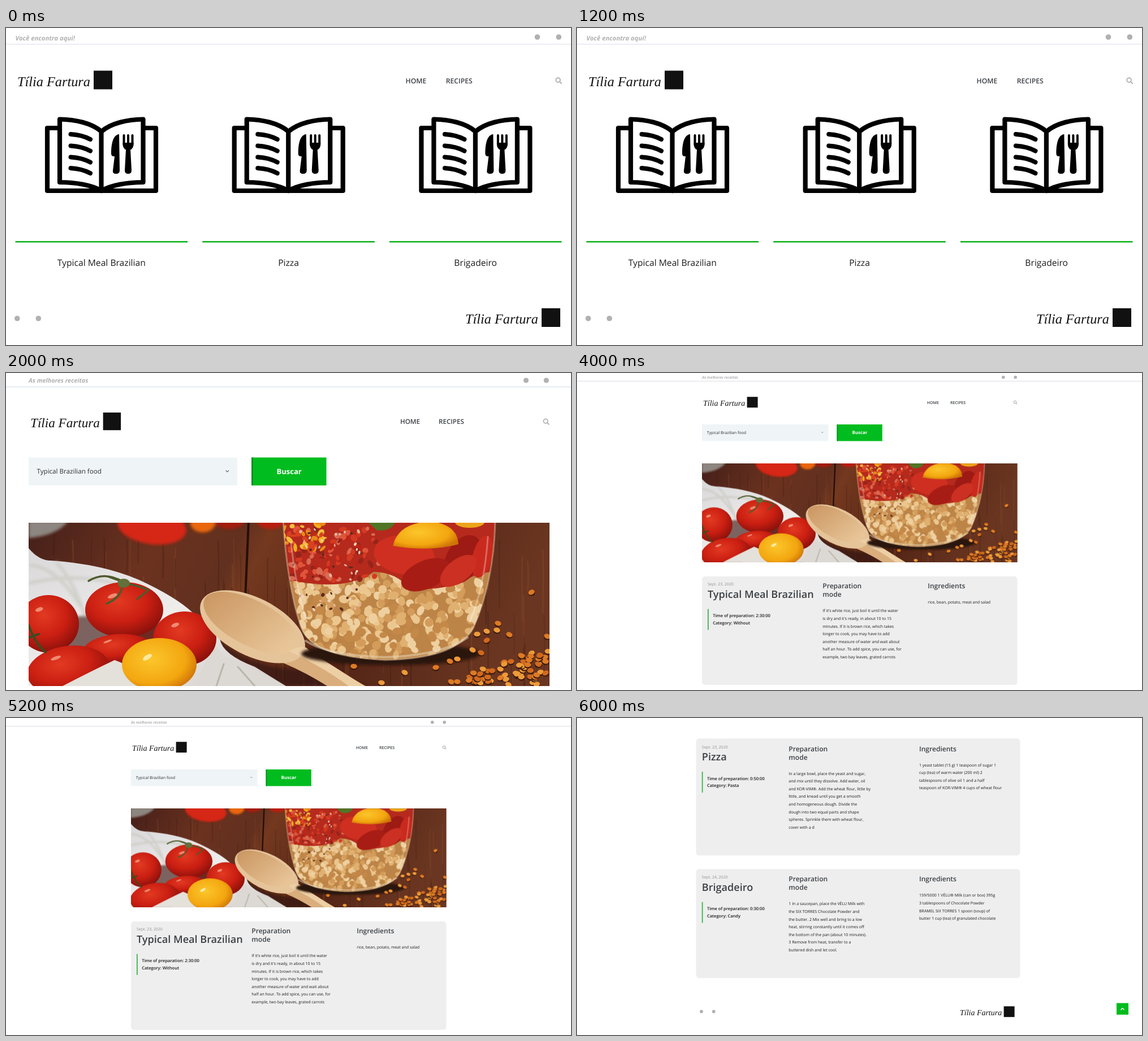
An HTML page for the animation above (8 s loop, 999 by 561 pixels).

```html
<!DOCTYPE html>
<html lang="en">
<head>
<meta charset="utf-8">
<title>Recipe site tour</title>
<style>
  html, body { margin: 0; width: 100%; height: 100%; overflow: hidden; background: #fff; }
  svg { display: block; width: 100vw; height: 100vh; }
  text { font-family: "Open Sans", sans-serif; text-rendering: geometricPrecision; }
  .brand { font-family: "Liberation Serif", "Times New Roman", serif; font-style: italic; }
</style>
</head>
<body>
<svg id="stage" viewBox="0 0 999 561" xmlns="http://www.w3.org/2000/svg"></svg>
<script>
const GREEN = '#00bc1e', GREY = '#b1b1b1', INK = '#1c1c1c', HEAD = '#3b4045';
const BRAND = 'Tília Fartura';
const HOLD = 2000;

let seed = 11;
const rnd = () => (seed = (seed * 16807) % 2147483647) / 2147483647;
const pick = list => list[Math.floor(rnd() * list.length)];

// Basic shapes
const text = (x, y, str, size, fill = INK, more = '') =>
  `<text x="${x}" y="${y}" font-size="${size}" fill="${fill}" ${more}>${str}</text>`;
const bold = (x, y, str, size, fill = INK, more = '') =>
  text(x, y, str, size, fill, 'font-weight="600" ' + more);
const rect = (x, y, w, h, fill, r = 0) =>
  `<rect x="${x}" y="${y}" width="${w}" height="${h}" rx="${r}" fill="${fill}"/>`;
const oval = (x, y, rx, ry, fill, turn = 0) =>
  `<ellipse cx="${x}" cy="${y}" rx="${rx}" ry="${ry}" fill="${fill}" transform="rotate(${turn} ${x} ${y})"/>`;
const path = (d, fill, more = '') => `<path d="${d}" fill="${fill}" ${more}/>`;
const line = (d, color, w, more = '') =>
  path(d, 'none', `stroke="${color}" stroke-width="${w}" stroke-linecap="round" stroke-linejoin="round" ${more}`);
const repeat = (n, fn) => Array.from({ length: n }, (_, i) => fn(i)).join('');

// Page parts
const social = (x1, x2, y, r) => oval(x1, y, r, r, GREY) + oval(x2, y, r, r, GREY);

const search = (x, y, k) =>
  `<g transform="translate(${x} ${y}) scale(${k})">
    <circle cx="-.9" cy="-.9" r="3.9" fill="none" stroke="${GREY}" stroke-width="1.9"/>
    ${line('M2.2 2.2L5 5', GREY, 2.1)}</g>`;

const logo = (x, y, k) =>
  `<g transform="translate(${x} ${y}) scale(${k})">
    ${text(0, 10, BRAND, 24.3, '#111', 'class="brand"')}
    ${rect(135, -17, 33, 33, '#111')}</g>`;

const menu = (x1, x2, y, size) =>
  bold(x1, y, 'HOME', size, HEAD) + bold(x2, y, 'RECIPES', size, HEAD);

const slogan = (x, y, str, size) =>
  text(x, y, str, size, GREY, 'font-weight="700" font-style="italic"');

function book(dx) {
  const half = 'M168.500 183C151 168 122 162 95 161.500V273C123 273 152 278 168.500 288';
  return `<g transform="translate(${dx} 0)">
    ${line('M92 177H73V288H265V177H246', '#000', 8.2)}
    ${line(half, '#000', 8.2)}
    <g transform="translate(337.500 0) scale(-1 1)">${line(half, '#000', 8.2)}</g>
    ${line('M168.500 183V288', '#000', 8.2)}
    ${[188, 208.5, 228.5, 248].map(y => line(`M114.500 ${y}Q134 ${y + 1} 149 ${y + 9}`, '#000', 8)).join('')}
    ${path('M200 188C190 189 186 203 186 222Q186 227 190 227H192L189 252Q188 258 194.500 258Q201 258 201 252Z', '#000')}
    ${[208.5, 216, 223.5].map(x => line(`M${x} 190V206`, '#000', 4)).join('')}
    ${path('M206.500 203H225.500Q226 213 220 215.500L222 252Q222 258 216 258Q210 258 210 252L212 215.500Q206 213 206.500 203Z', '#000')}
  </g>`;
}

const finder = (x, y, k) =>
  `<g transform="translate(${x} ${y}) scale(${k})">
    ${rect(0, 0, 369, 49.5, '#eff4f7')}
    ${text(14.5, 28.5, 'Typical Brazilian food', 11.62, '#2e2e2e')}
    ${line('M349 23.200L351.300 25.500L353.600 23.200', '#777', 1.4)}
    ${rect(394, 0, 132.5, 49.5, GREEN)}${rect(394, 0, 2.6, 49.5, '#0b8a1c')}
    ${text(460.7, 29.4, 'Buscar', 13, '#fff', 'font-weight="700" text-anchor="middle"')}</g>`;

const lines = (x, y, rows) =>
  rows.map((row, i) => text(x, y + i * 13.55, row, 7.03)).join('');

// y is the layout origin; box is the grey panel [x, y, w, h]
function card(y, box, cols, r) {
  const [a, b, c] = cols;
  return rect(...box, '#eee', 5.5) +
    text(a, y + 17.7, r.date, 7.03, '#8f9294') +
    bold(a, y + 39.2, r.name, 18.07, HEAD) +
    rect(a, y + 59, 1.7, 37, '#2fb344') +
    bold(a + 9.2, y + 73.6, 'Time of preparation: ' + r.time, 7.53) +
    bold(a + 9.2, y + 86, 'Category: ' + r.kind, 7.53) +
    bold(b, y + 22.6, 'Preparation', 12.05, HEAD) +
    bold(b, y + 37.8, 'mode', 12.05, HEAD) +
    lines(b, y + 64.8, r.steps) +
    bold(c, y + 22.6, 'Ingredients', 12.05, HEAD) +
    lines(c, y + 49.8, r.needs);
}

const meal = {
  date: 'Sept. 23, 2020', name: 'Typical Meal Brazilian', time: '2:30:00', kind: 'Without',
  steps: ["If it's white rice, just boil it until the water", "is dry and it's ready, in about 10 to 15",
    'minutes. If it is brown rice, which takes', 'longer to cook, you may have to add',
    'another measure of water and wait about', 'half an hour. To add spice, you can use, for',
    'example, two bay leaves, grated carrots'],
  needs: ['rice, bean, potato, meat and salad']
};
const pizza = {
  date: 'Sept. 23, 2020', name: 'Pizza', time: '0:50:00', kind: 'Pasta',
  steps: ['In a large bowl, place the yeast and sugar,', 'and mix until they dissolve. Add water, oil',
    'and KOR-VIM®. Add the wheat flour, little by', 'little, and knead until you get a smooth',
    'and homogeneous dough. Divide the', 'dough into two equal parts and shape',
    'spheres. Sprinkle them with wheat flour,', 'cover with a d'],
  needs: ['1 yeast tablet (15 g) 1 teaspoon of sugar 1', 'cup (tea) of warm water (200 ml) 2',
    'tablespoons of olive oil 1 and a half', 'teaspoon of KOR-VIM® 4 cups of wheat flour']
};
const sweet = {
  date: 'Sept. 24, 2020', name: 'Brigadeiro', time: '0:30:00', kind: 'Candy',
  steps: ['1 In a saucepan, place the VÉLU Milk with', 'the SIX TORRES Chocolate Powder and',
    'the butter. 2 Mix well and bring to a low', 'heat, stirring constantly until it comes off',
    'the bottom of the pan (about 10 minutes).', '3 Remove from heat, transfer to a',
    'buttered dish and let cool.'],
  needs: ['159/5000 1 VÉLU® Milk (can or box) 395g', '3 tablespoons of Chocolate Powder',
    'BRAMEL SIX TORRES 1 spoon (soup) of', 'butter 1 cup (tea) of granulated chocolate']
};

// Still life: tomatoes, spoon, jar and lentils on wood
function photo() {
  const jar = 'M490 260C494 330 505 400 520 445C531 482 570 503 670 508C760 506 806 486 826 452C850 400 864 330 865 260Z';
  const tomato = (x, y, rx, ry, turn = 0) =>
    oval(x, y, rx, ry, 'url(#red)', turn) + oval(x - rx * .3, y - ry * .5, rx * .13, ry * .07, '#f08a72', -20);
  const lentil = (x, y) =>
    oval(x, y + 2, 6, 4.5, '#3a180c') + oval(x, y, 5.8, 4.3, pick(['#dd7a24', '#ec9a3a', '#d0691e']), rnd() * 60 - 30);
  const bits = (n, x, y, w, h, colors, size = 1) => repeat(n, () =>
    oval(x + w * rnd(), y + h * rnd(), (3 + 5 * rnd()) * size, (2 + 4 * rnd()) * size, pick(colors), rnd() * 180));
  const strays = [[929, 388], [870, 443], [833, 462], [850, 457], [868, 455], [890, 463], [850, 473],
    [957, 466], [615, 519], [664, 548], [705, 530], [760, 521], [785, 510], [798, 506], [825, 490], [840, 495]];
  return `<defs>
    <linearGradient id="wood" x2="1" y2="0.150">
      <stop offset="0" stop-color="#46201a"/><stop offset=".25" stop-color="#6b321f"/>
      <stop offset=".41" stop-color="#62301f"/><stop offset=".46" stop-color="#74391f"/>
      <stop offset=".7" stop-color="#522416"/><stop offset="1" stop-color="#6a3621"/></linearGradient>
    <radialGradient id="red" cx=".42" cy=".35" r=".68">
      <stop offset="0" stop-color="#e23a22"/><stop offset=".55" stop-color="#cb1f12"/><stop offset="1" stop-color="#86100b"/></radialGradient>
    <radialGradient id="gold" cx=".4" cy=".4" r=".65">
      <stop offset="0" stop-color="#fcc62c"/><stop offset=".7" stop-color="#f3a60f"/><stop offset="1" stop-color="#cf7408"/></radialGradient>
    <linearGradient id="bowl" x2="1" y2=".2">
      <stop offset="0" stop-color="#c9945f"/><stop offset="1" stop-color="#e8c598"/></linearGradient>
    <linearGradient id="cloth" x2="1" y2="1">
      <stop offset="0" stop-color="#d9d8da"/><stop offset=".5" stop-color="#efedeb"/><stop offset="1" stop-color="#d3cdc9"/></linearGradient>
    <clipPath id="frame">${rect(40, 265.5, 921, 288, '#000')}</clipPath>
    <clipPath id="glass"><path d="${jar}"/></clipPath>
    <filter id="soft"><feGaussianBlur stdDeviation="2.500"/></filter>
  </defs>
  <g id="photo" clip-path="url(#frame)">
    ${rect(40, 265, 921, 289, 'url(#wood)')}
    ${repeat(110, () => {
      const x = 40 + 920 * rnd(), y = 250 + 260 * rnd();
      return line(`M${x} ${y}q${6 * rnd() - 3} 30 0 ${50 + 80 * rnd()}`, pick(['#32140c', '#32140c', '#95552f']), 1 + 2 * rnd(), 'opacity=".28"');
    })}
    ${line('M429 260L423 400', '#260e08', 4)}
    <g filter="url(#soft)">
      ${path('M40 262H110Q90 288 40 292Z', '#8d8580')}
      ${oval(258, 272, 61, 31, '#d62513', 8)}${oval(348, 266, 22, 16, '#e9660f')}
      ${oval(395, 264, 25, 12, '#a31a10')}${oval(468, 262, 24, 14, '#b81c10')}
      ${path('M330 420Q400 520 520 525L640 553H420Z', '#2e140c', 'opacity=".6"')}
    </g>
    ${path('M40 310Q58 332 80 332Q170 338 235 366Q300 396 330 424L378 470Q382 498 440 520L495 554H40Z', 'url(#cloth)')}
    <g filter="url(#soft)">
      ${line('M40 372Q130 352 200 375M90 336Q130 380 150 470M44 340Q90 345 130 410', '#c9c9c0', 6, 'opacity=".7"')}
      ${oval(140, 470, 60, 40, '#7c6460')}${oval(262, 476, 50, 34, '#6d2a20')}
    </g>
    ${tomato(75, 444, 54, 51)}${tomato(209, 419, 69, 49)}${tomato(316, 470, 56, 48)}
    ${tomato(198, 488, 61, 26, -4)}${tomato(110, 526, 73, 43, -8)}
    ${line('M146 368Q175 350 208 370L180 360M208 372Q232 376 252 384L232 400M206 374Q204 398 178 408', '#4d5a2c', 3.5)}
    ${oval(208, 372, 11, 8, '#62703a')}
    ${line('M40 446Q52 480 70 494M40 468L58 462', '#3d4a20', 4)}
    ${path('M100 554Q150 528 192 508Q212 514 222 530L242 554Z', '#e4e0da')}
    ${oval(271, 516, 66, 47, 'url(#gold)')}${oval(250, 503, 9, 4, '#ffeaa0', -30)}
    ${path('M337 554Q342 520 372 484Q384 506 440 524L494 554Z', '#dcd8d3')}
    ${line('M385 515L372 554M410 520L440 554', '#b9b6ab', 3)}
    ${path('M470 510Q505 475 531 487Q575 520 636 554H568Q530 530 490 513Z', '#d9ae7c')}
    ${oval(436, 449, 101, 51, '#e6c49a', 27)}
    ${oval(433, 442, 92, 40, 'url(#bowl)', 27)}
    ${path('M500 492Q530 478 535 491L634 554H606Q560 520 500 492Z', '#edcfa5')}
    <g filter="url(#soft)">${oval(680, 497, 158, 20, '#2c130b')}</g>
    <g clip-path="url(#glass)">
      ${rect(485, 260, 385, 250, '#bd8447')}
      ${repeat(390, () => oval(512 + 326 * rnd(), 350 + 152 * rnd(), 6 + 4 * rnd(), 5 + 3 * rnd(),
        pick(['#ebc78f', '#dfb070', '#d39c5a', '#eed0a0', '#c48949']), rnd() * 180))}
      ${path('M485 260H870V352Q835 350 800 374Q760 384 715 383Q690 352 650 352Q600 388 500 366Z', '#b52a1d')}
      ${bits(90, 500, 272, 160, 95, ['#d43a22', '#e0553a', '#bd2316', '#d96a52', '#96241a'])}
      ${bits(34, 490, 264, 70, 50, ['#f2ae1b', '#e98b17', '#f4be3c', '#d9411f'])}
      ${bits(60, 505, 275, 120, 150, ['#f0d2b8', '#5a2a1c', '#e8b49c'], .5)}
      ${oval(704, 322, 54, 34, '#cf2f20', 8)}${oval(808, 330, 30, 46, '#9e1a14', 28)}
      ${oval(842, 325, 17, 38, '#c92a1d', 14)}${oval(742, 357, 46, 25, '#a71d15', -24)}
      ${oval(800, 350, 38, 20, '#cb3022', -38)}
      ${path('M638 262H690Q680 282 655 278Z', '#507525')}
      ${path('M684 306Q694 264 752 263Q798 268 800 303Q750 317 684 306Z', 'url(#gold)')}
      ${oval(820, 264, 26, 10, '#eda41a')}
    </g>
    ${line(jar, '#e5d3b4', 3, 'opacity=".4"')}
    ${line('M530 474Q570 500 670 503Q770 500 816 468', '#e9dcc0', 4, 'opacity=".5"')}
    ${line('M504 300Q512 380 532 440M852 290Q846 380 820 440', '#fff', 3, 'opacity=".3"')}
    ${strays.map(p => lentil(...p)).join('')}
    ${repeat(64, () => {
      const u = Math.sqrt(rnd());
      return lentil(765 + 194 * u, 552 - 70 * u * rnd());
    })}
  </g>`;
}

const scenes = [
  rect(0, 28, 999, 1.2, '#dfe2ea') +
  slogan(16.5, 22.4, 'Você encontra aqui!', 11.31) + social(939.5, 977.3, 16, 4.8) +
  logo(20, 92.5, 1) + menu(706.5, 777.7, 97.5, 12.18) + search(977, 93, 1) +
  ['Typical Meal Brazilian', 'Pizza', 'Brigadeiro'].map((name, i) => {
    const dx = i * 330.7;
    return book(dx) + rect(16.5 + dx, 377, 304.6, 2.6, '#10b41f') +
      text(168.8 + dx, 421.4, name, 15.66, INK, 'text-anchor="middle"');
  }).join('') +
  social(19.8, 57.3, 514, 4.8) + logo(812, 513, 1),

  rect(0, 23.8, 999, 1.4, '#dce7ed') +
  slogan(40, 16.6, 'As melhores receitas', 10.79) + social(919.5, 955.3, 13, 4.6) +
  logo(43, 86, .953) + menu(697, 765, 90.3, 11.62) + search(955, 86, .95) +
  finder(40, 149.5, 1) + photo(),

  rect(0, 14, 999, 1, '#dcdde5') +
  slogan(221, 9.9, 'As melhores receitas', 6.53) + social(753.8, 775.2, 7.5, 2.8) +
  logo(223, 52, .575) + menu(618.8, 660, 54.9, 7.03) + search(775, 52, .57) +
  finder(221, 90.5, .6055) +
  '<use href="#photo" transform="translate(221 160.500) scale(.6055) translate(-40 -265.500)"/>' +
  card(358.6, [221, 360, 557.5, 192], [231, 434.3, 620.3], meal),

  card(36, [210.5, 36.3, 573, 207], [220.8, 374.3, 605], pizza) +
  card(266.6, [210.5, 267.2, 573, 193], [220.8, 374.3, 605], sweet) +
  social(220, 241.8, 519.5, 2.9) + logo(677, 520, .575) +
  rect(954, 504.5, 21, 20.5, GREEN) + line('M961.800 516.300L964.500 513.600L967.200 516.300', '#fff', 1.4)
];

const stage = document.getElementById('stage');
stage.innerHTML = scenes.map(s => `<g class="scene">${s}</g>`).join('');

const count = scenes.length;
const blink = [
  { opacity: 1, offset: 0, easing: 'step-end' },
  { opacity: 0, offset: 1 / count, easing: 'step-end' },
  { opacity: 0, offset: 1 }
];
stage.querySelectorAll('.scene').forEach((el, i) => el.animate(blink, {
  duration: HOLD * count, delay: (i - count) * HOLD, iterations: Infinity
}));
</script>
</body>
</html>
```
